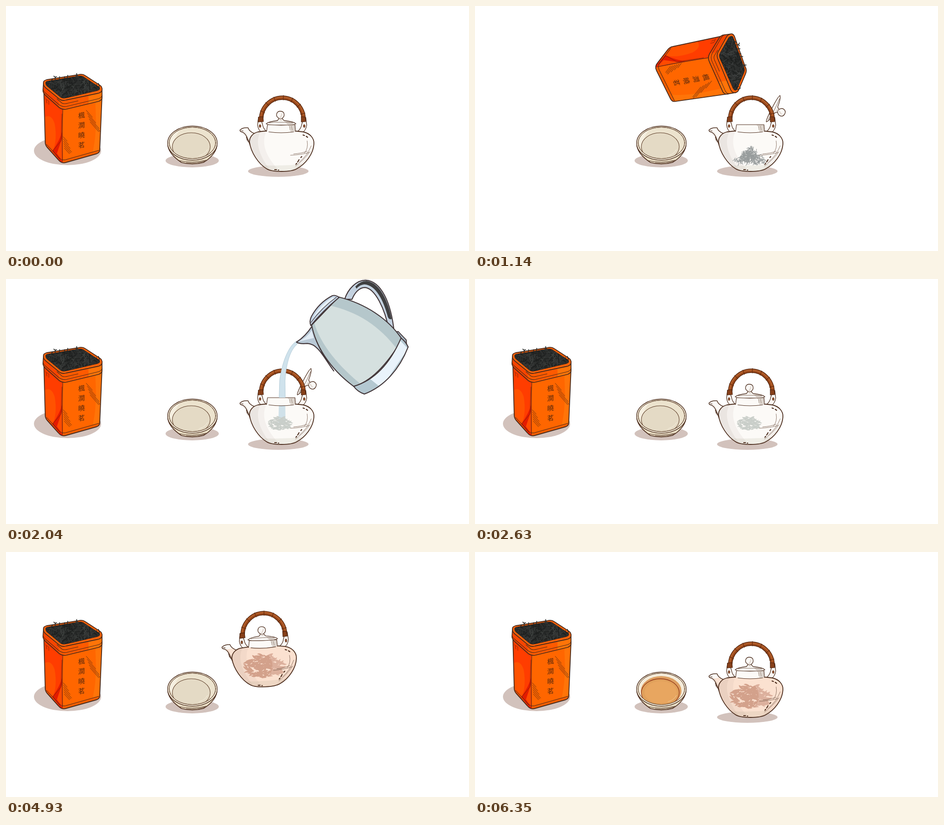
Animation of 1027 by 545 pixels, one loop 6980 ms. Source, as an HTML page with a canvas:

```html
<!DOCTYPE html>
<html lang="zh-Hant">
<head>
<meta charset="utf-8">
<title>Brewing tea</title>
<style>
html, body { margin: 0; width: 100%; height: 100%; overflow: hidden; background: #fff; }
canvas { display: block; width: 1027px; height: 545px; }
</style>
</head>
<body>
<canvas id="stage" width="1027" height="545"></canvas>
<script>
const ctx = document.getElementById('stage').getContext('2d');
const LOOP = 6980, INK = '#4a2b1b', SHADOW = '#d2c2bc';
const LABEL = '楓澗曉茗';
ctx.lineCap = ctx.lineJoin = 'round';

const cache = new Map();
function path(d) {
  if (typeof d !== 'string') return d;
  if (!cache.has(d)) cache.set(d, new Path2D(d));
  return cache.get(d);
}
function shape(d, fill, line, width = 1.5) {
  const p = path(d);
  if (fill) { ctx.fillStyle = fill; ctx.fill(p); }
  if (line) { ctx.strokeStyle = line; ctx.lineWidth = width; ctx.stroke(p); }
}
function round(x, y, rx, ry) {
  const p = new Path2D();
  p.ellipse(x, y, rx, ry, 0, 0, 7);
  return p;
}
function oval(x, y, rx, ry, fill, line, width) {
  shape(round(x, y, rx, ry), fill, line, width);
}
function within(d, draw) {
  ctx.save();
  ctx.clip(path(d));
  draw();
  ctx.restore();
}
// Places a group so that its pivot (px, py) lands on (x, y).
function posed(px, py, x, y, angle, draw) {
  ctx.save();
  ctx.translate(x, y);
  ctx.rotate(angle);
  ctx.translate(-px, -py);
  draw();
  ctx.restore();
}
function faded(alpha, draw) {
  ctx.save();
  ctx.globalAlpha *= alpha;
  draw();
  ctx.restore();
}
function random(seed) {
  return () => {
    seed = (seed + 0x6D2B79F5) | 0;
    let v = Math.imul(seed ^ (seed >>> 15), 1 | seed);
    v ^= v + Math.imul(v ^ (v >>> 7), 61 | v);
    return ((v ^ (v >>> 14)) >>> 0) / 4294967296;
  };
}
function strands(count, seed, place, min, max) {
  const r = random(seed), p = new Path2D();
  for (let i = 0; i < count; i++) {
    const [x, y] = place(r), a = r() * 6.28, l = min + r() * (max - min), b = (r() - .5) * l;
    const dx = Math.cos(a) * l / 2, dy = Math.sin(a) * l / 2;
    p.moveTo(x - dx, y - dy);
    p.quadraticCurveTo(x - dy / l * b * 2, y + dx / l * b * 2, x + dx, y + dy);
  }
  return p;
}
function softLeaves() {
  const r = random(23), p = new Path2D();
  for (let i = 0; i < 150; i++) {
    const a = r() * 6.28, q = Math.pow(r(), .62);
    const x = Math.cos(a) * q * 43, y = Math.sin(a) * q * 25;
    const h = (r() - .5) * 1.7, l = 6 + r() * 5, w = 1.8 + r() * 1.6, bend = (r() - .5) * 9;
    const c = Math.cos(h), s = Math.sin(h);
    const at = (u, v) => [x + u * c - v * s, y + u * s + v * c];
    p.moveTo(...at(-l, 0));
    p.bezierCurveTo(...at(-l / 3, bend - w), ...at(l / 3, -bend - w), ...at(l, -bend / 2));
    p.bezierCurveTo(...at(l / 3, -bend + w), ...at(-l / 3, bend + w), ...at(-l, 0));
  }
  return p;
}
const inTin = r => [86 + r() * 126, 154 + r() * 52];
const tinDark = strands(190, 3, inTin, 7, 15);
const tinPale = strands(130, 9, inTin, 6, 13);
const pile = strands(230, 5, r => {
  const u = (r() + r() + r()) / 1.5 - 1, top = 32 * Math.pow(1 - Math.abs(u), 1.35) + 6;
  return [611 + u * 42, 350 - r() * top];
}, 5, 13);
const brewed = softLeaves();

// Tea tin
const RIM = 'M83 172Q82 166 90 164L160 153Q169 150 176 155L208 176Q214 180 213 187Q212 192 205 194L134 209Q124 212 117 206L88 182Q83 178 83 172Z';
const MOUTH = 'M88 172Q87 168 94 167L159 156Q168 154 174 159L206 180Q211 185 203 188L135 204Q126 207 120 202L91 178Q88 175 88 172Z';
const TIN = 'M84 190L87 303Q87 309 91 314L116 342Q123 351 133 348L200 329Q208 327 208 319L213 200L127 226Z';
const COLLAR = 'M83 172L82 189Q83 195 89 200L117 225Q125 232 136 229L206 212Q213 209 213 203L213 184L126 206Z';

function hatch(x, y, n, dx, dy, lx, ly) {
  const p = new Path2D();
  for (let i = 0; i < n; i++) {
    const k = 1 - Math.abs(i - n / 2) / n;
    p.moveTo(x + dx * i, y + dy * i);
    p.lineTo(x + dx * i + lx * k, y + dy * i + ly * k);
  }
  shape(p, null, '#5a2a10', .9);
}
function tin() {
  shape(TIN, '#ff6600');
  within(TIN, () => {
    shape('M80 185L126 224L125 352L80 310Z', '#ff3d00');
    shape('M84 248Q100 238 108 262Q114 296 104 324L84 312Z', '#ff5200');
    shape('M125 278Q120 298 103 322L120 345L126 350Z', '#e41b00');
    shape('M125 292L113 328L125 346Z', '#ff4a00');
    shape('M198 214L214 205L208 328L190 332Q203 290 198 214Z', '#ff7408');
    shape('M127 342L208 320L208 334L127 354Z', '#f55e00');
  });
  shape('M126 229Q124 290 125 345M90 308L116 336Q123 344 132 342L206 321', null, INK, 1.1);
  shape('M124 240L122 300L104 322L119 340M87 206L95 212L95 219M89 209L91 216', null, '#7a2407', .9);
  hatch(178, 232, 5, 2.2, 6.5, 27, 31);
  hatch(127, 291, 6, .5, 5, 17, 19);
  shape(TIN, null, INK, 1.9);

  shape(COLLAR, '#ff5a00');
  within(COLLAR, () => {
    shape('M80 175L117 209L117 235L80 200Z', '#f74400');
    shape('M183 193L213 184L213 210L183 220Z', '#ff7408');
  });
  shape(COLLAR, null, INK, 1.8);
  shape('M82 185Q83 190 89 195L117 219Q126 226 136 223L206 206Q213 203 213 198M113 206L124 216Q129 219 138 216L160 211', null, INK, 1.1);
  shape(RIM, '#ff6208', INK, 1.8);
  shape(MOUTH, '#2c2e2d', INK, 1.3);
  within(MOUTH, () => {
    shape(tinDark, null, '#1d1f1e', 1.3);
    shape(tinPale, null, '#454846', .8);
  });
  shape('M109 165L109 158L106 156M109 159L112 157M118 164L119 157M130 161L130 157M136 160L137 154M155 158L157 150M158 157L158 153M206 185L207 177L205 172M196 178L201 175M98 168L104 162', null, '#2c2e2d', 1.7);

  ctx.fillStyle = '#5b2a0c';
  ctx.font = '15px "Noto Sans CJK TC", "Noto Sans CJK JP", "Noto Sans CJK", sans-serif';
  ctx.textAlign = 'center';
  ctx.textBaseline = 'middle';
  [...LABEL].forEach((c, i) => {
    ctx.save();
    ctx.transform(1, -.16, 0, 1, 167.5, 243 + i * 22);
    ctx.fillText(c, 0, 0);
    ctx.restore();
  });
}

// Cup
const RIM_LINE = '#5a3a25';
function cup(tea, pour) {
  oval(413, 344, 59, 15, SHADOW);
  shape('M359 311C362 328 377 340 389 348Q413 355 438 348C450 341 465 328 468 311Z', '#eadfc6', INK, 1.6);
  shape('M384 344Q413 351 444 343M400 349Q425 351 441 345', null, INK, 1);
  oval(413.5, 305, 55, 38, '#f1e9d7', INK, 1.4);
  oval(413.5, 304.5, 51.5, 35, '#ece3ce', RIM_LINE, 1);
  within(round(413.5, 304.5, 51, 34.5), () => {
    shape('M360 300Q366 280 390 272Q370 292 371 320Z', '#f5efe0');
    oval(411, 313, 42, 31, pour ? '#dfdac3' : '#e4dac5', RIM_LINE, 1.1);
    shape('M428 333Q441 330 447 319', null, '#f4eddb', 1.2);
    if (tea) faded(tea, () => {
      oval(413, 305, 52, 35, '#f4ecdb');
      oval(413, 309, 45, 33, '#dd9f62');
      oval(411, 313, 42, 31, '#e0a05b', '#8f3315', 1.3);
      oval(412, 312, 36, 25, '#e8a660');
      shape('M428 333Q441 330 447 319', null, '#f2c48e', 1.2);
    });
  });
  oval(413.5, 304.5, 51.5, 35, null, RIM_LINE, 1);
}
function teaStream() {
  faded(.88, () => {
    shape('M456 201C444 200 437 208 434 222L420 284C416 308 395 312 394 333C396 342 407 342 417 342C434 342 440 334 436 324C429 308 431 294 434 272C437 245 441 221 456 212Z', '#f9aa80');
    shape('M456 201Q450 202 450 208C443 219 436 236 434 262L431 300C433 308 432 290 434 272C437 245 441 221 456 212Z', '#f97a55');
    shape('M419 286C416 306 404 310 399 319Q410 315 414 304Z', '#f58a62');
  });
  oval(413.5, 305, 55, 38, null, INK, 1);
  oval(413.5, 304.5, 51.5, 35, null, RIM_LINE, .8);
}

// Teapot
const POT = 'M559 280C547 283 540 292 540 302C543 326 560 351 578 362C590 370 632 370 645 362C664 352 682 329 683 307C684 294 674 283 659 280C630 276 586 276 559 280Z';
const SPOUT = 'M519 276Q525 270 537 271Q540 280 552 284L545 317C537 303 535 282 522 280Q519 279 519 276Z';

function lid() {
  shape('M577 262Q583 257 602 255L606 250Q600 247 600 242Q601 234 608 234Q617 234 617 242Q617 247 612 250L617 255Q638 257 643 262Q641 265 610 265Q579 265 577 262Z', '#fbf9f6', INK, 1.3);
  shape('M612 237Q615 243 609 249L614 255L608 255L605 251Q610 244 612 237Z', '#e2d9d2');
  shape('M618 257Q632 258 639 262L624 263Z', '#d9d0c9');
  shape('M584 260Q610 257 636 260M604 250Q608 252 613 250', null, INK, .7);
}
function ear() {
  shape('M560 248L558 265Q560 277 567 281L578 279Q570 272 569 263L567 257Z', '#faf7f3', INK, 1.3);
  oval(563.5, 267, 1.8, 3.3, '#a4562c', INK, 1);
}
function handle() {
  const cx = 613, cy = 252, arc = (rx, ry, from, to) => {
    const p = new Path2D();
    p.ellipse(cx, cy, rx, ry, 0, from, to);
    return p;
  };
  const bow = arc(47, 48, Math.PI, Math.PI * 2);
  ctx.lineCap = 'butt';
  shape(bow, null, '#4b210d', 9.6);
  shape(bow, null, '#a34f1e', 7.2);
  shape(arc(44.5, 45.5, 3.3, 6.1), null, '#8a3e16', 1.6);
  shape(arc(48.5, 49.5, 3.3, 6.1), null, '#bb6a36', 1.2);
  ctx.lineCap = 'round';
  for (let i = 0; i < 7; i++) {
    const a = 3.5 + i * .42, c = Math.cos(a), s = Math.sin(a);
    const p = new Path2D();
    p.moveTo(cx + c * 42, cy + s * 43);
    p.lineTo(cx + c * 52, cy + s * 53);
    shape(p, null, '#6b3113', 1.5);
  }
  shape('M560 247L570 246L571 257L559 258ZM655 246L664 247L665 257L655 258Z', '#86401a', '#4b210d', 1.2);
}
function leafBlob(size, tint) {
  const mix = (a, b) => Math.round(a + (b - a) * tint);
  const tone = `rgb(${mix(201, 220)},${mix(206, 176)},${mix(201, 157)})`;
  const x = 608 + (size - .58) * 8, y = 321;
  posed(0, 0, x, y, 0, () => {
    ctx.scale(size, size);
    shape(brewed, tone);
    if (tint) within(round(-20, 0, 38, 38), () => shape(brewed, 'rgba(200,142,118,.45)'));
  });
}
function teapot({ lidOff, heap, blob, tint, water }) {
  if (lidOff) posed(610, 262, 661.5, 228.5, 2.05, lid);
  shape(SPOUT, '#fbf9f6');
  if (tint) within(SPOUT, () => faded(tint, () => shape('M524 283L552 277L552 316L538 314Z', '#fae3d4')));
  shape('M526 277Q538 284 543 312Q536 301 533 286Z', 'rgba(150,125,115,.16)');
  shape(SPOUT, null, INK, 1.5);
  shape('M533 291L535 299M536 296L537 302M522 277L526 278', null, INK, 1.2);

  ear();
  ctx.save();
  ctx.translate(1225, 0);
  ctx.scale(-1, 1);
  ear();
  ctx.restore();

  shape(POT, '#fcfaf7');
  within(POT, () => {
    if (tint) faded(tint, () => shape(POT, '#fbe1d0'));
    shape('M535 275L568 275C548 300 563 338 592 372L560 372L535 330Z', 'rgba(150,125,115,.10)');
    shape('M535 275L580 275C562 304 578 340 612 372L560 372L535 330Z', 'rgba(150,125,115,.08)');
    shape('M545 353Q610 358 672 350L660 375L560 375Z', 'rgba(150,145,120,.13)');
    shape('M684 300C676 332 655 354 626 369L660 369L690 330Z', 'rgba(150,125,115,.10)');
    if (water) shape(waterStream(), 'rgba(190,216,228,.7)');
    if (heap) posed(0, 0, 611, 352, 0, () => {
      ctx.scale(.5 + heap / 2, heap);
      ctx.translate(-611, -352);
      shape(pile, null, '#979c9c', 1.1);
    });
    if (blob) leafBlob(blob, tint);
  });
  shape(POT, null, INK, 1.8);
  shape('M631 332Q655 331 672 326M638 329Q656 328 668 323M668 300Q671 317 662 327M677 311Q669 332 650 348M674 324Q660 344 642 356', null, '#6f5445', .8);
  shape('M656 335L654 337M650 342L647 347M645 350L643 352M596 364L600 364M604 365L605 365M659 287L662 288M666 290L669 292', null, INK, 2.2);

  shape('M580 263L578 279Q610 284 642 279L641 263Z', '#fcfaf7');
  shape('M624 264L641 264L641 279L631 280Q632 271 624 264Z', '#ddd5ce');
  shape('M578 279L580 264L641 264L642 279M583 280Q610 284 638 280', null, INK, 1.2);
  shape('M629 268L630 276M633 267L635 276', null, '#8d7a6d', .8);
  if (!lidOff) lid();
  handle();
}

// Kettle
const KETTLE = 'M676 97C680 140 705 195 757 241Q812 231 873 146C847 98 799 60 741 40Z';
function kettle() {
  const line = '#43373a';
  shape('M754 46C763 24 784 6 804 8C838 13 856 62 857 130L846 124C841 74 823 28 801 24C788 23 777 34 770 48Z', '#c3d1df', line, 2.2);
  shape('M780 20Q793 8 807 10C836 17 850 62 854 99Q849 101 846 94C840 58 826 20 800 17Q790 17 782 25Z', '#3f3f40');
  shape('M857 129L866 128L882 148L882 157L871 152Z', '#a9bac6', line, 2);
  shape('M639 132Q660 121 677 99Q680 142 716 203C697 173 687 140 663 137Q645 137 639 132Z', '#b9c9d6', line, 2.2);
  shape('M644 131Q663 124 675 109L678 126Q664 128 644 131Z', '#e2ecf5');
  shape(KETTLE, '#d5e0df');
  within(KETTLE, () => {
    shape('M670 95C682 148 715 208 757 248L776 240C729 195 692 143 682 92Z', '#b5c7cb');
    shape('M735 35L716 56C780 76 826 112 862 170L885 150L850 80Z', '#b5c7cb');
  });
  shape(KETTLE, null, line, 2.2);
  shape('M674 98Q671 88 677 78Q696 49 727 36Q734 34 742 41Q702 69 674 98Z', '#c4d4e4', line, 2.2);
  shape('M680 82Q698 54 727 40L734 42Q702 60 680 82Z', '#e7f1fa');
  shape('M675 91Q702 60 736 40', null, line, 1.2);
  const base = 'M757 241Q826 227 871 143Q880 151 885 164C862 211 825 247 779 260Q765 254 757 241Z';
  shape(base, '#b4c8d1');
  within(base, () => shape('M792 225L866 145L884 168L818 250Z', '#e9f3fb'));
  shape(base, null, line, 2.2);
}
function waterStream() {
  return path('M645 138C630 146 614 176 607 225L604 322Q612 328 620 322L619 226C622 182 632 156 646 145Z');
}

// Leaves dropping from the tin, moving in 100 ms steps
function dropping(step) {
  const r = random(40 + step), p = new Path2D();
  const top = 178 + step * 18, span = 60 + step * 12;
  for (let i = 0; i < 30; i++) {
    const k = r(), x = 591 + k * 18 + (r() - .5) * 14, y = top + k * span;
    const a = r() * 3.14;
    p.moveTo(x, y);
    p.quadraticCurveTo(x + 3, y + 2, x + Math.cos(a) * 7, y + Math.sin(a) * 7);
  }
  shape(p, null, '#343735', 1.4);
}

// Latest value whose start time has passed
function held(t, ...keys) {
  let v = 0;
  for (const [at, value] of keys) if (t >= at) v = value;
  return v;
}

function draw(t) {
  ctx.fillStyle = '#fff';
  ctx.fillRect(0, 0, 1027, 545);

  const tipped = t >= 740 && t < 1440;
  const lifted = t >= 4930 && t < 5660;
  const serving = t >= 5660 && t < 5990;
  const flowing = t >= 1710 && t < 2470;

  if (!tipped) {
    oval(136.5, 322, 74.5, 32, SHADOW);
    tin();
  }
  cup(Math.max(0, Math.min(1, (t - 5990) / 360)), serving);
  if (serving) teaStream();

  if (!lifted && !serving) oval(604, 367.5, 67, 12.5, SHADOW);
  const pot = () => teapot({
    lidOff: t >= 370 && t < 2630,
    heap: held(t, [940, .35], [1040, .7], [1140, 1], [2040, 0]),
    blob: held(t, [2040, .58], [2930, .7], [3060, .8], [3600, 1]),
    tint: held(t, [3230, .4], [4000, .7], [4130, 1]),
    water: flowing
  });
  if (serving) posed(612, 252, 514, 135, -.628, pot);
  else if (lifted) posed(612, 252, 571, 184, -.04, pot);
  else pot();

  if (tipped) {
    if (t >= 840 && t < 1140) dropping(Math.floor((t - 840) / 100));
    posed(167, 243, 512, 158, 1.388, tin);
  }
  if (flowing) {
    ctx.save();
    ctx.beginPath();
    ctx.rect(590, 120, 80, 144);
    ctx.clip();
    shape(waterStream(), '#cfe2ec', '#a9c3d0', .8);
    ctx.restore();
  }
  if (t >= 1540 && t < 2550) {
    if (flowing) posed(760, 135, 765, 133, -.087, kettle);
    else kettle();
  }
}

const start = performance.now();
function tick() {
  draw((performance.now() - start) % LOOP);
  requestAnimationFrame(tick);
}
tick();
</script>
</body>
</html>
```
